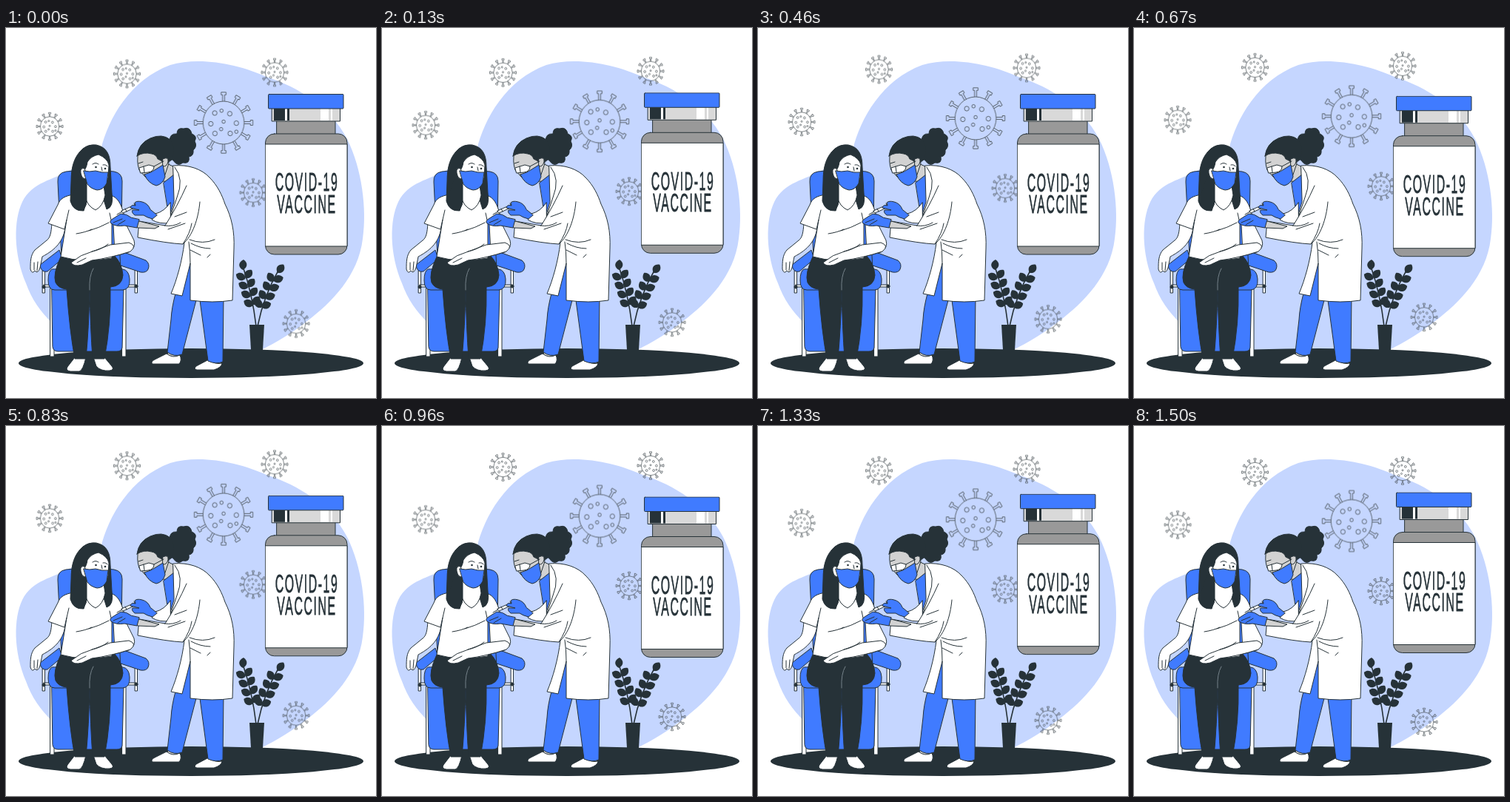
An HTML page that plays this animation: 500 by 500 pixels, repeating every 1540 ms.

```html
<!DOCTYPE html>
<html lang="en">
<head>
<meta charset="utf-8">
<title>Vaccination</title>
<style>
  html, body { margin: 0; width: 100%; height: 100%; overflow: hidden; background: #fff; }
  svg { display: block; width: 100vw; height: 100vh; }
  .fig * { stroke: #263238; stroke-width: 1; stroke-linecap: round; stroke-linejoin: round; }
  .w { fill: #fff; }
  .b { fill: #407bff; }
  .k { fill: #263238; }
  .s { fill: #d2d2d2; }
  .g { fill: #999; }
  .n { fill: none; }
  .fig .o { stroke: none; }
  .float { animation: float 1540ms linear infinite; }
  #germs { --rise: -10px; animation-delay: -40ms; fill: none; stroke: #4b5459; }
  #vial { --rise: 10px; animation-delay: -1310ms; }
  @keyframes float { 50% { transform: translateY(var(--rise)); } }
  .label { font: 34.5px "Liberation Sans", Arial, sans-serif; letter-spacing: 3.4px; text-anchor: middle; fill: #263238; stroke: #263238; stroke-width: .6; }
  .label text { vector-effect: non-scaling-stroke; }
</style>
</head>
<body>
<svg viewBox="0 0 500 500">
  <path fill="#c5d6ff" d="M128 165C138 122 168 70 222 50C262 38 315 49 352 66C395 80 438 106 461 150C481 190 488 245 482 285C476 335 440 371 407 396C387 412 365 425 345 435L120 440C76 414 42 388 27 345C10 305 10 260 22 235C35 208 65 205 85 193C105 182 122 182 128 165Z"/>
  <g id="germs" class="float"></g>
  <ellipse class="k" cx="250" cy="453" rx="233" ry="20"/>

  <g id="plant" class="k">
    <path class="n" stroke="#263238" stroke-width="1.6" d="M338 403Q333 360 320 322M340 403Q348 362 370 324"/>
    <path d="M329 401H349L347 435H331Z"/>
  </g>

  <g class="fig" id="chair">
    <path class="b" d="M76 330L70 208Q69 196 81 194Q114 190 146 194Q157 196 157 207L155 330Z"/>
    <path class="w" d="M49.500 328H52.500V358H49.500ZM174.500 327H177.500V358H174.500ZM51 347H176V350H51Z"/>
    <circle class="k" cx="51" cy="350" r="2"/><circle class="k" cx="176" cy="349" r="2"/>
    <path class="b" d="M46 320L72 300L76 312L56 329Q47 331 46 320ZM154 301L189 314Q195 319 192 326Q190 331 182 330L155 321Z"/>
    <path class="w" d="M60 350H65V444H60ZM157 350H162V444H157Z"/>
    <path class="b" d="M62 352H159L157 432Q156 437 150 437H70Q64 437 63 431Z"/>
    <path class="b" d="M62 326Q57 328 57 341Q57 354 66 354H158Q168 353 167 339Q166 327 158 326Z"/>
  </g>

  <g class="fig" id="patient">
    <path class="w" d="M93 445L83 458Q80 463 87 464H99Q104 463 108 445ZM118 445L122 457Q128 464 140 463Q147 462 143 457L133 445Z"/>
    <path class="k" d="M74 309Q63 332 67 344Q71 352 82 353Q86 410 93 447H108Q112 405 113 353Q114 405 117 447H133Q142 400 141 350Q157 349 158 334Q157 318 146 307Z"/>
    <path class="n" style="stroke:#75828a" d="M113 354Q112 335 118 325"/>
    <path class="w" d="M62 264C61 277 60 283 55 287L39 300C33 307 33 316 33 326Q35 333 39 328Q43 333 46 324L49 309C62 302 77 292 80 270Z"/>
    <path class="n" d="M38 317V327M43 316L42 328"/>
    <path class="w" d="M145 259L157 255L173 287Q176 297 166 303Q138 311 117 313L103 320Q92 323 89 317L101 309L146 292Z"/>
    <path class="w" d="M91 225C80 227 73 230 70 239L57 264L79 272L82 259L74 309Q105 318 143 311L143 264L161 259C157 241 153 231 144 227L125 224Z"/>
    <path class="w" d="M141 293L166 290Q178 294 168 302Q140 311 116 314L103 320Q91 323 88 317L101 308Z"/>
    <path class="n" d="M82 259L85 246M143 264L140 250M95 278Q108 276 116 272M112 274Q126 270 139 263M116 302Q128 300 138 292M96 317L108 311"/>
    <path class="k" d="M104 163C92 173 88 188 88 207L87 234Q91 248 105 247L109 235L131 229L136 245Q146 242 143 223L141 188C141 171 136 161 122 158Q111 157 104 163Z"/>
    <path class="w" d="M107 204V228Q110 241 121 246Q131 241 134 226L132 213Z"/>
    <path class="w" d="M104 194Q109 190 110 181Q115 173 125 171Q137 176 139 185L138 202Q135 217 126 218Q111 216 108 201Z"/>
    <path class="k" d="M104 184L109 203V234Q108 247 97 246Q87 240 89 229Z"/>
    <path class="w" d="M109 203Q103 206 101 196Q100 188 106 190Z"/>
    <path class="b" d="M105 193Q113 195 121 193Q130 196 138 195L136 210Q131 219 123 219Q114 217 110 211Z"/>
    <path class="n" d="M117 184Q121 181 125 184M131 185Q135 184 137 187M129 188L130 193"/>
    <circle class="k o" cx="121.500" cy="188" r="1.300"/><circle class="k o" cx="134" cy="190" r="1.300"/>
  </g>

  <g class="fig" id="doctor">
    <path class="s" d="M220 434H236L234 447H217ZM274 440H291V453H273Z"/>
    <path class="w" d="M217 440L201 448Q195 451 198 454H234Q238 449 235 442Q225 447 217 440ZM274 448L257 457Q253 461 258 462H281Q291 459 292 453Q281 455 274 448Z"/>
    <path class="b" d="M246 316C231 344 224 374 223 394L218 438Q227 445 238 441L257 368L262 368L273 450Q284 455 293 451L294 360Z"/>
    <path class="s" d="M215 182L228 188L227 208L211 207Z"/>
    <path class="b" d="M213 209L227 198L230 240L221 260Z"/>
    <path class="w" d="M226 186C247 184 265 191 275 202C286 213 292 226 296 238C305 256 309 275 308 298L306 368Q280 372 249 368V318L238 362L223 359C231 340 238 315 241 290L219 262L227 235Z"/>
    <path class="n" d="M228 188Q241 204 231 229L222 256M249 318Q249 302 247 289M248 286Q266 293 282 286M250 291Q263 298 276 298M249 300L263 307M272 310L276 306"/>
    <path class="w" d="M222 236Q214 248 202 251L197 259Q208 266 222 263Z"/>
    <path class="w" d="M244 213C236 231 226 250 215 267L180 261L178 283Q218 291 239 292C252 281 260 258 262 235"/>
    <path class="n" d="M214 267Q226 269 236 263M219 272L242 264M228 255L244 249M239 292Q249 277 251 264"/>
    <path class="s" d="M176 260L207 268L201 271L178 270Z"/>
    <path class="w" d="M156 247L174 239L176 242L158 250Z"/>
    <path class="n" d="M150 252L157 248M173 237L177 244M161 244L163 248"/>
    <path class="b" d="M204 253L198 258Q190 256 186 253L174 253Q169 249 171 246L180 246L168 243Q169 238 175 240L174 236Q177 233 184 235Q192 237 195 245Z"/>
    <path class="b" d="M180 259L177 270L160 267Q149 269 142 264Q139 261 144 258L155 251Q163 251 169 256Z"/>
    <path class="n" d="M145 263L157 258M151 266L161 260"/>
    <path class="s" d="M179 168Q176 180 180 192L188 201Q201 210 212 207L220 183L215 160Z"/>
    <path class="k" d="M221 153Q221 142 231 143Q231 134 240 136Q249 133 251 143Q259 146 255 153Q259 160 253 165Q254 173 247 174Q249 184 239 182Q232 188 226 179Q218 175 222 167Z"/>
    <path class="k" d="M177 173Q179 156 195 149Q211 142 222 151Q230 162 224 178L215 185Q210 178 205 177Q203 171 197 170Q186 167 177 173Z"/>
    <path class="s" d="M212 177Q220 173 219 181Q217 188 212 187Z"/>
    <path class="b" d="M187 198Q196 196 204 190L212 185L215 201Q212 211 203 213Q192 210 187 198Z"/>
    <path class="w" d="M180 189L193 185L200 187Q200 194 192 195L182 196Z"/>
    <path class="n" d="M200 187L213 180M179 183L185 181M186 187L187 195"/>
  </g>

  <g id="vial" class="float">
    <g class="fig">
      <rect class="g" x="366" y="120" width="79" height="28"/>
      <rect class="g" x="350.500" y="140" width="110.500" height="163" rx="12"/>
      <path class="w" d="M350.500 154H461V292H350.500Z"/>
      <rect x="359.500" y="105" width="92" height="18" fill="#d9d9d9"/>
      <path class="k o" d="M362 106H377V122H362ZM380 106H383V122H380Z"/>
      <path class="w o" d="M377 106H380V122H377ZM425 106H436V122H425ZM439 106H441V122H439Z"/>
      <rect class="b" x="354.500" y="86.500" width="101.500" height="19.500" rx="1"/>
    </g>
    <g class="label">
      <text transform="translate(406.500 217.500) scale(.46 1)">COVID-19</text>
      <text transform="translate(406.500 247) scale(.46 1)">VACCINE</text>
    </g>
  </g>
</svg>
<script>
  const add = (parent, html) => parent.insertAdjacentHTML('beforeend', html);
  const germs = document.getElementById('germs');
  const plant = document.getElementById('plant');

  const dots = [[-.1, -.56], [-.43, -.45], [.3, -.42], [0, -.05], [-.62, .05], [.62, .02],
                [-.12, .3], [.32, .5], [-.42, .5], [.62, .42]];

  // Round body with capped spikes
  function germ(x, y, r) {
    const tip = r * 1.42, cap = r * .12, stem = r * .05;
    let html = `<circle r="${r}"/>`;
    for (let turn = 0; turn < 360; turn += 30) {
      html += `<path transform="rotate(${turn})" d="M${-stem} ${-r}V${cap - tip}H${-cap}V${-tip}H${cap}V${cap - tip}H${stem}V${-r}"/>`;
    }
    dots.forEach(([dx, dy], i) => {
      html += `<circle cx="${dx * r}" cy="${dy * r}" r="${r * (i % 3 ? .11 : .08)}"/>`;
    });
    add(germs, `<g transform="translate(${x} ${y}) scale(.96 1)" stroke-width="${r > 20 ? .9 : .7}">${html}</g>`);
  }
  germ(294, 128.5, 29);
  [[59, 133.5], [163.5, 62.5], [363, 60.5], [334, 223], [392, 400]].forEach(([x, y]) => germ(x, y, 13.2));

  const leaf = (x, y, turn) =>
    add(plant, `<path transform="translate(${x} ${y}) rotate(${turn})" d="M0 0C-8 -4 -6 -11 0 -14C6 -11 7 -4 0 0Z"/>`);

  // Leaf pairs along a stem, with one at the tip
  function branch(x0, y0, x1, y1, lean) {
    for (let i = 0; i < 4; i++) {
      const x = x0 + (x1 - x0) * i / 4, y = y0 + (y1 - y0) * i / 4;
      leaf(x, y, lean - 52);
      leaf(x, y - 1, lean + 50);
    }
    leaf(x1, y1, lean + 16);
  }
  branch(334, 375, 320, 327, -12);
  branch(345, 378, 367, 331, 20);
</script>
</body>
</html>
```
